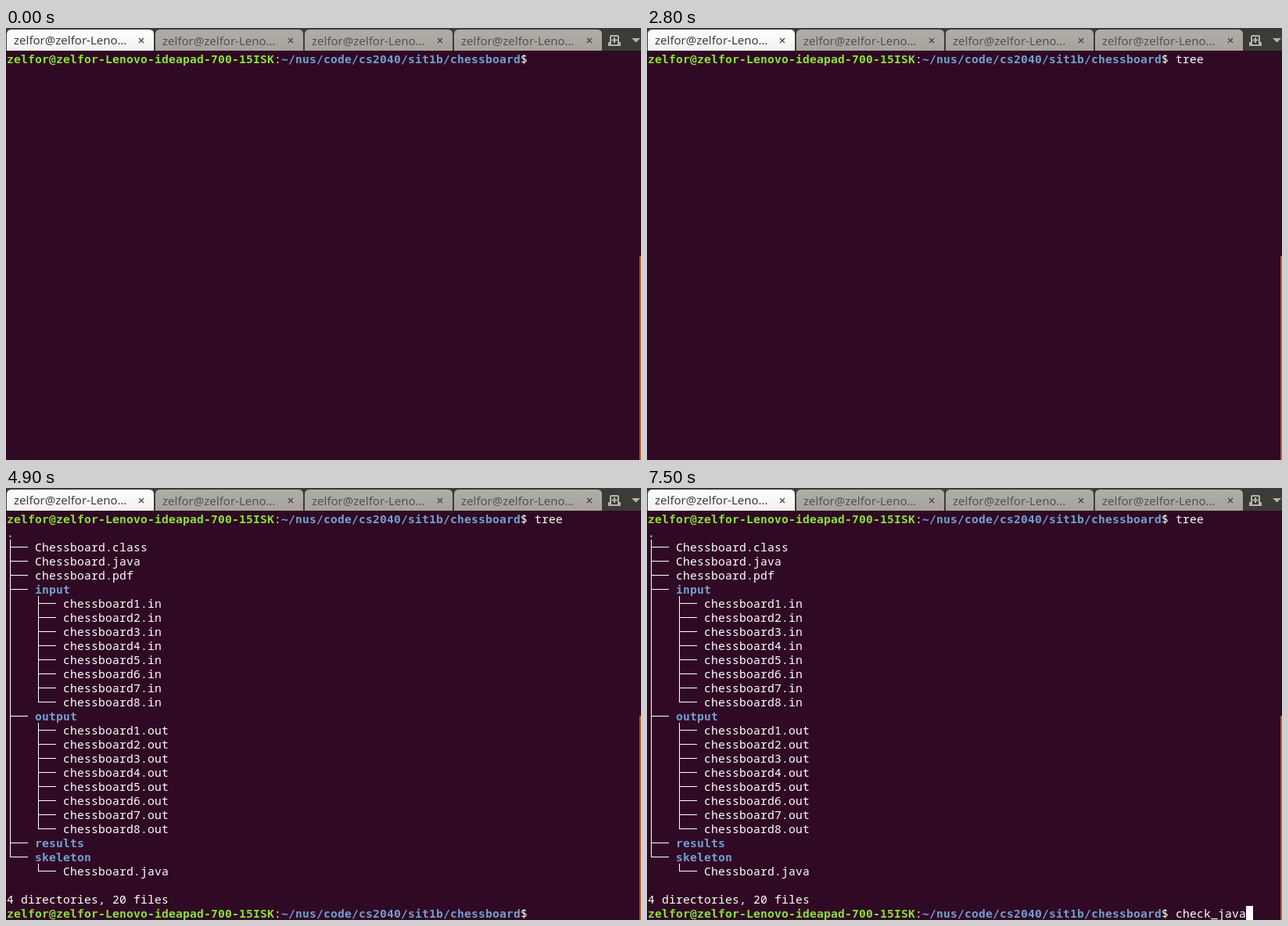
These frames come from a looping animation (812x552 px, 8 s). An HTML page:

```html
<!DOCTYPE html>
<html lang="en">
<head>
<meta charset="utf-8">
<title>Terminal</title>
<style>
  html, body { margin: 0; width: 100%; height: 100%; overflow: hidden; background: #300a24; }
  svg { display: block; width: 812px; height: 552px; }
  .mono { font: 14.667px "Noto Sans Mono", "DejaVu Sans Mono", monospace; fill: #fff; white-space: pre; }
  .bold { font-family: "DejaVu Sans Mono", monospace; font-weight: 700; }
  .user { fill: #8ae234; }
  .dir { fill: #729fcf; }
  .title { font: 15px "Noto Sans", "Open Sans", sans-serif; fill: #54524e; }
  .title.active { fill: #3c3c3c; }
  .close { stroke: #45433f; stroke-width: 1.2; fill: none; }
  .branch { stroke: #fff; fill: none; }
</style>
</head>
<body>
<svg viewBox="0 0 812 552">
  <defs>
    <linearGradient id="active" x2="0" y2="1">
      <stop stop-color="#fff"/><stop offset="1" stop-color="#f2f1f0"/>
    </linearGradient>
    <linearGradient id="idle" x2="0" y2="1">
      <stop stop-color="#b0ada7"/><stop offset="1" stop-color="#a7a39c"/>
    </linearGradient>
  </defs>
  <rect width="812" height="552" fill="#300a24"/>
  <rect width="812" height="29" fill="#3c3b37"/>
  <g id="tabs"></g>
  <g fill="none" stroke="#b5b2ac" stroke-width="2">
    <path d="M770 21H773V11Q773 10 774 10H782Q783 10 783 11V21H786M771 18V22H785V18"/>
    <path d="M778 12V19M774.5 15.5H781.5"/>
  </g>
  <path d="M800 13H811L805.5 18.5Z" fill="#b5b2ac"/>
  <g id="screen"></g>
  <g id="output"></g>
  <rect id="cursor" width="9" height="18" fill="#fff"/>
  <rect x="810" y="291" width="2" height="261" fill="#b85c3c"/>
</svg>
<script>
const CELL = 9, ROW = 18, LEFT = 1, TOP = 30, LOOP = 8000;
const PROMPT_COL = 75, LAST_ROW = 28;
const USER = 'zelfor';
const $ = id => document.getElementById(id);
const colX = col => LEFT + col * CELL;
const rowY = row => TOP + row * ROW;

function add(parent, tag, attrs, text = '') {
  const el = document.createElementNS('http://www.w3.org/2000/svg', tag);
  for (const key in attrs) el.setAttribute(key, attrs[key]);
  el.textContent = text;
  parent.append(el);
  return el;
}

// Text on the character grid
function print(parent, row, col, text, style = '') {
  const x = [...text].map((_, i) => colX(col + i)).join(' ');
  return add(parent, 'text', { x, y: rowY(row) + 15, class: 'mono ' + style }, text);
}

function prompt(parent, row) {
  print(parent, row, 0, USER + '@' + USER + '-Lenovo-ideapad-700-15ISK', 'bold user');
  print(parent, row, 38, ':');
  print(parent, row, 39, '~/nus/code/cs2040/sit1b/chessboard', 'bold dir');
  print(parent, row, 73, '$');
}

function tab(x, width, active) {
  const tabs = $('tabs'), y = active ? 16 : 17;
  add(tabs, 'path', {
    d: `M${x} 29V8q0 -6 6 -6h${width - 12}q6 0 6 6V29Z`,
    fill: active ? 'url(#active)' : 'url(#idle)'
  });
  add(tabs, 'text', { x: x + 9, y: y + 5, class: active ? 'title active' : 'title' },
    USER + '@' + USER + '-Leno…');
  const cx = x + (active ? 172 : 173);
  add(tabs, 'path', { d: `M${cx - 3} 13l6 6m0 -6l-6 6`, class: 'close' });
}

function tree(parent) {
  const numbered = ext => Array.from({ length: 8 }, (_, i) => `chessboard${i + 1}.${ext}`);
  const root = [
    ['Chessboard.class'], ['Chessboard.java'], ['chessboard.pdf'],
    ['input', numbered('in')], ['output', numbered('out')],
    ['results', []], ['skeleton', ['Chessboard.java']]
  ];
  let row = 2, d = '';
  const arm = (r, col) => { d += `M${colX(col) + 4} ${rowY(r) + 9.5}H${colX(col + 3)}`; };
  const stem = (from, to, col) => { d += `M${colX(col) + 4.5} ${rowY(from)}V${rowY(to) + 10}`; };

  print(parent, 1, 0, '.', 'bold dir');
  let last = row;
  for (const [name, kids] of root) {
    last = row;
    arm(row, 0);
    print(parent, row++, 4, name, kids ? 'bold dir' : '');
    if (!kids || !kids.length) continue;
    stem(row, row + kids.length - 1, 4);
    for (const kid of kids) {
      arm(row, 4);
      print(parent, row++, 8, kid);
    }
  }
  stem(2, last, 0);
  add(parent, 'path', { d, class: 'branch' });
  print(parent, 27, 0, '4 directories, 20 files');
}

const ENTER = 3100;
const commands = [
  { row: 0, text: 'tree', keys: [1600, 1800, 2000, 2200] },
  { row: LAST_ROW, text: 'check_java',
    keys: [5100, 5300, 5500, 5600, 5800, 6600, 7100, 7200, 7300, 7500] }
];
// The cursor starts hidden and flips at each of these times
const blinks = [600, 1200, 1600, 2800, 3100, 3700, 4300, 4900, 5100];

tab(1, 188, true);
[191, 382, 573].forEach(x => tab(x, 189, false));
prompt($('screen'), 0);
tree($('output'));
prompt($('output'), LAST_ROW);
for (const c of commands) {
  c.glyphs = [...c.text].map((ch, i) => print($('screen'), c.row, PROMPT_COL + i, ch));
}

function draw(now) {
  const t = now % LOOP;
  const past = times => times.filter(at => at <= t).length;
  const current = commands[t < ENTER ? 0 : 1];
  $('output').style.display = t < ENTER ? 'none' : '';
  for (const c of commands) {
    const typed = past(c.keys);
    c.glyphs.forEach((g, i) => { g.style.display = i < typed ? '' : 'none'; });
  }
  const cursor = $('cursor');
  cursor.setAttribute('x', colX(PROMPT_COL + past(current.keys)));
  cursor.setAttribute('y', rowY(current.row));
  cursor.style.display = past(blinks) % 2 ? '' : 'none';
}

const start = performance.now();
function tick() {
  draw(performance.now() - start);
  requestAnimationFrame(tick);
}
tick();
</script>
</body>
</html>
```
